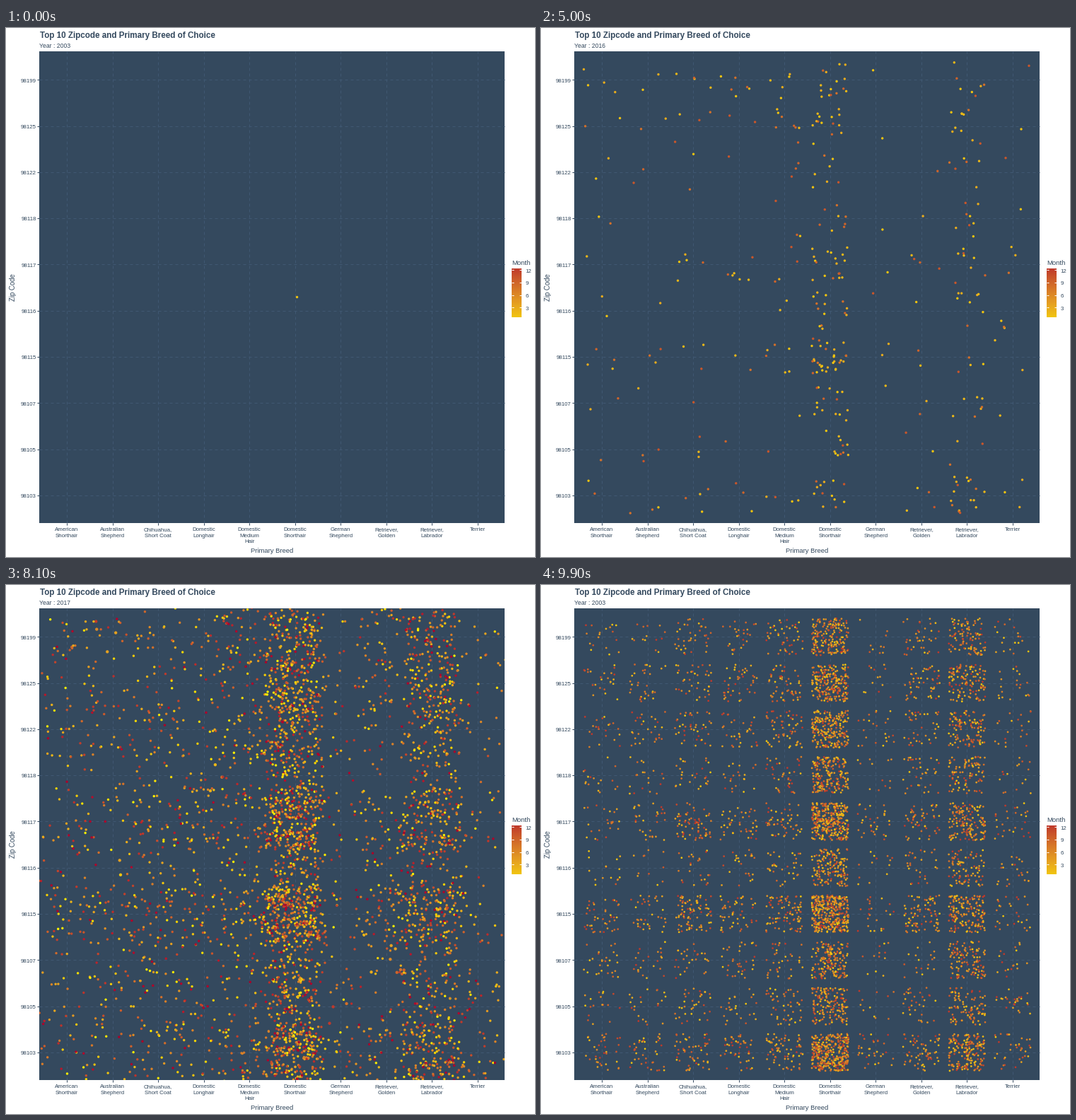
A matplotlib script for the animation above (10000 ms loop, 748 by 748 pixels).

```python
import matplotlib.pyplot as plt
import numpy as np
from matplotlib.animation import FuncAnimation
from matplotlib.patches import Rectangle

SIZE, DPI = 748, 100
PT = 72 / DPI  # points per pixel
SLATE, GRID = "#34495e", "#405872"
LEFT, RIGHT, TOP, BOTTOM = 47, 705, 33, 700
X0, DX, Y0, DY = 86, 64.55, 73.2, 65.3

BREEDS = ["American\nShorthair", "Australian\nShepherd", "Chihuahua,\nShort Coat",
          "Domestic\nLonghair", "Domestic\nMedium\nHair", "Domestic\nShorthair",
          "German\nShepherd", "Retriever,\nGolden", "Retriever,\nLabrador", "Terrier"]
ZIPS = [98199, 98125, 98122, 98118, 98117, 98116, 98115, 98107, 98105, 98103]
YEARS = [2003, 2014, 2015, 2016, 2017, 2018]
HOLD_ENDS = [9, 26, 43, 60, 77, 93]
STEPS = 7

# mean pets per cell in the fullest year, and how much each zip code adds
BREED_MEAN = [24, 25, 42, 34, 50, 225, 17, 41, 120, 23]
ZIP_FACTOR = [.85, 1.05, .95, .75, 1.4, .7, 1.6, .85, .75, 1.4]

rng = np.random.default_rng(11)

# ---- colour: the month scale is interpolated in CIE Lab ----
TO_XYZ = np.array([[.4124, .3576, .1805], [.2126, .7152, .0722], [.0193, .1192, .9505]])
WHITE = TO_XYZ.sum(axis=1)


def to_lab(rgb):
    rgb = np.asarray(rgb) / 255
    lin = np.where(rgb > .04045, ((rgb + .055) / 1.055) ** 2.4, rgb / 12.92)
    fx, fy, fz = np.cbrt(TO_XYZ @ lin / WHITE)
    return np.array([116 * fy - 16, 500 * (fx - fy), 200 * (fy - fz)])


def to_rgb(lab):
    fy = (lab[:, 0] + 16) / 116
    f = np.column_stack([fy + lab[:, 1] / 500, fy, fy - lab[:, 2] / 200])
    xyz = np.where(f > 6 / 29, f ** 3, (f - 4 / 29) * 108 / 841) * WHITE
    lin = np.clip(xyz @ np.linalg.inv(TO_XYZ).T, 0, 1)
    return np.where(lin > .0031308, 1.055 * lin ** (1 / 2.4) - .055, 12.92 * lin)


LOW, HIGH = to_lab([241, 196, 15]), to_lab([192, 57, 43])


def month_lab(month):
    return LOW + (HIGH - LOW) * (np.asarray(month, float)[:, None] - 1) / 11


# ---- data: one table of x, y, L, a, b per year, keyed by cell and rank ----
def make_state(x, y, month):
    x, y = np.asarray(x, float), np.asarray(y, float)
    cell = (np.rint((y - Y0) / DY) * 10 + np.rint((x - X0) / DX)).astype(int)
    order = np.argsort(cell, kind="stable")
    cell = cell[order]
    rank = np.arange(len(cell)) - np.searchsorted(cell, cell)
    table = np.column_stack([x, y, month_lab(month)])[order]
    return cell * 1000 + rank, table


def jittered(share, pick_month):
    count = rng.poisson(share * np.outer(ZIP_FACTOR, BREED_MEAN)).ravel()
    row, col = np.divmod(np.repeat(np.arange(100), count), 10)
    n = len(row)
    return make_state(X0 + DX * (col + rng.uniform(-.4, .4, n)),
                      Y0 + DY * (row + rng.uniform(-.4, .4, n)), pick_month(n))


def early_or_autumn(n):
    early = rng.random(n) < .62
    return np.where(early, rng.integers(1, 4, n), rng.integers(8, 11, n))


def any_month(n):
    return rng.integers(1, 13, n)


STATES = [
    make_state([411], [380], [1]),
    make_state([168, 470, 600, 660, 674], [120, 150, 73, 578, 262], [2, 9, 2, 2, 9]),
    jittered(.016, early_or_autumn),
    jittered(.064, early_or_autumn),
    jittered(.68, any_month),
    jittered(1, any_month),
]


# ---- motion ----
def back_in(p):
    return p ** 3 - p * np.sin(p * np.pi)


def blend(old, new, v):
    """Shared points move, leaving ones shrink, arriving ones fade in."""
    (ka, a), (kb, b) = old, new
    if v == 1:
        return b, np.ones(len(b)), np.ones(len(b))
    _, ia, ib = np.intersect1d(ka, kb, return_indices=True)
    leaving, arriving = np.delete(a, ia, 0), np.delete(b, ib, 0)
    moving = a[ia] + (b[ib] - a[ia]) * v
    sizes = [len(leaving), len(arriving), len(moving)]
    scale = np.repeat([1 - v, 1, 1], sizes)
    alpha = np.repeat([1, max(v, 0), 1], sizes)
    return np.vstack([leaving, arriving, moving]), scale, alpha


# ---- stage ----
fig = plt.figure(figsize=(SIZE / DPI, SIZE / DPI), dpi=DPI, facecolor="white")
ax = fig.add_axes([0, 0, 1, 1])
ax.axis("off")


def label(x, y, s, px, **kw):
    style = dict(va="baseline", color=SLATE, family="Liberation Sans", fontsize=px * PT)
    return ax.text(x, y, s, **{**style, **kw})


def line(xs, ys, color=SLATE, **kw):
    ax.plot(xs, ys, color=color, lw=PT, solid_capstyle="butt", **kw)


panel = Rectangle((LEFT, TOP), RIGHT - LEFT, BOTTOM - TOP, fc=SLATE, lw=0)
ax.add_patch(panel)
for i in range(10):
    x, y = X0 + i * DX, Y0 + i * DY
    line([x, x], [BOTTOM, TOP], GRID, dashes=(4, 4))
    line([LEFT, RIGHT], [y, y], GRID, dashes=(4, 4))
    line([x, x], [BOTTOM, BOTTOM + 2.7])
    line([LEFT - 2.7, LEFT], [y, y])
    label(43, y + 3.3, str(ZIPS[i]), 7.9, ha="right")
    for n, word in enumerate(BREEDS[i].split("\n")):
        label(x, 711.4 + 8.1 * n, word, 7.85, ha="center")

label(47.7, 13.7, "Top 10 Zipcode and Primary Breed of Choice", 11.6, weight="bold")
year = label(47.5, 28.2, "", 8.6)
label(376.3, 742, "Primary Breed", 9.5, ha="center")
label(9.6, 366.7, "Zip Code", 9.6, ha="center", va="center", rotation=90)

label(715.4, 334.5, "Month", 9.5)
bar = to_rgb(month_lab(np.linspace(12, 1, 69)))[:, None, :]
ax.imshow(bar, extent=(715, 729, 409, 340), aspect="auto", interpolation="nearest")
for n, month in enumerate((12, 9, 6, 3)):
    y = 342.3 + 17.65 * n
    line([715, 718], [y, y], "white")
    line([726, 729], [y, y], "white")
    label(734.3, y + 3.3, str(month), 7.9)

dots = ax.scatter([], [], linewidths=0, zorder=5)
dots.set_clip_path(panel)
ax.set(xlim=(0, SIZE), ylim=(SIZE, 0))


def draw(frame):
    stage = int(np.searchsorted(HOLD_ENDS, frame))
    step = STEPS if stage == 0 else min(frame - HOLD_ENDS[stage - 1], STEPS)
    old, new = (stage - 1) % len(YEARS), stage % len(YEARS)
    v = 1 if step == STEPS else back_in(step / STEPS)
    table, scale, alpha = blend(STATES[old], STATES[new], v)
    dots.set_offsets(table[:, :2])
    dots.set_sizes(((.8 + 2.6 * scale) * PT) ** 2)
    dots.set_facecolors(np.column_stack([to_rgb(table[:, 2:]), alpha]))
    year.set_text(f"Year : {YEARS[new if step >= 5 else old]}")
    return dots, year


anim = FuncAnimation(fig, draw, frames=100, interval=100, repeat=True)
plt.show()
```
